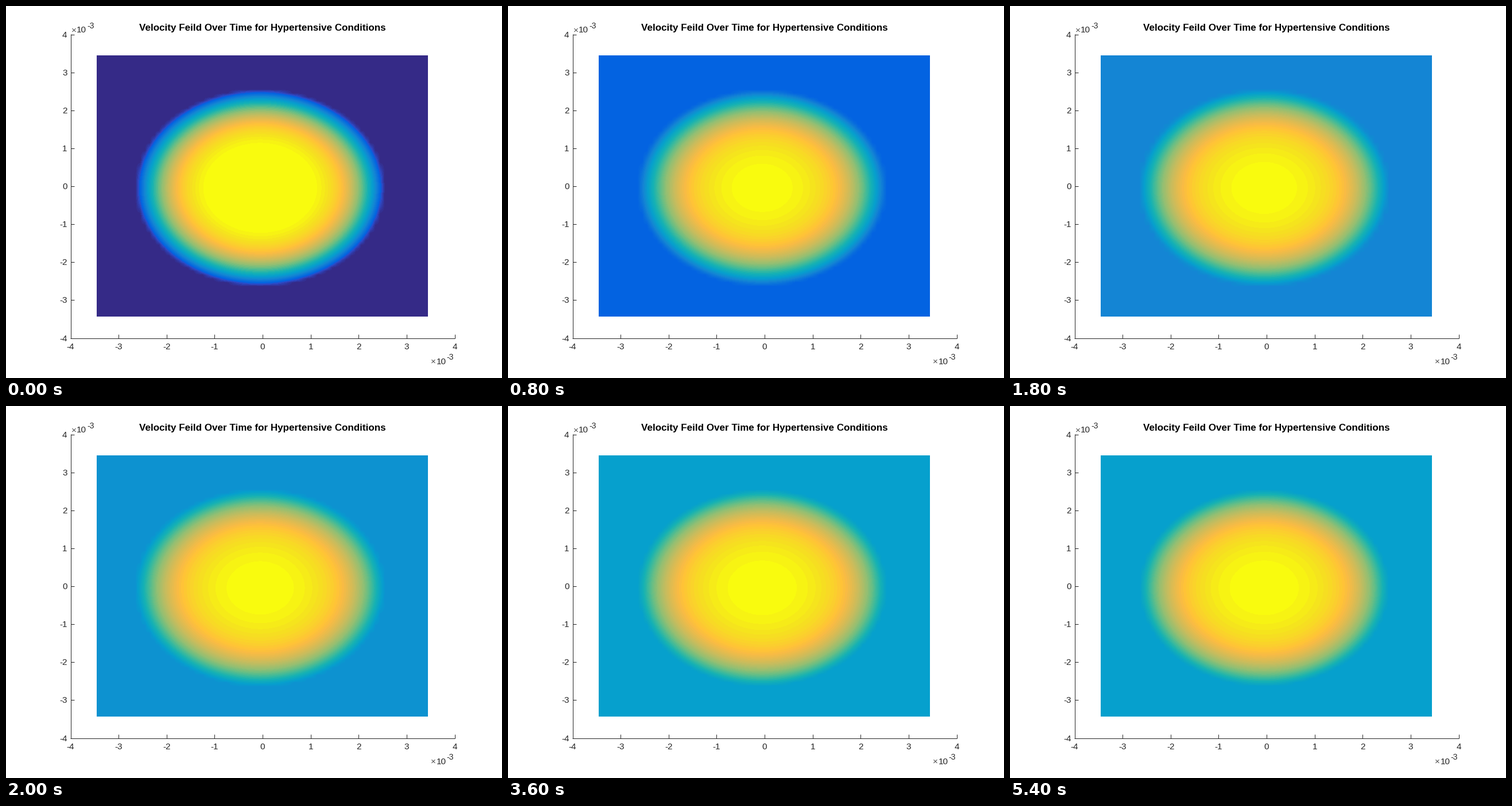
Animation, 864 px wide and 648 px high, one loop 5600 ms. Source, as a matplotlib script:

```python
import numpy as np
import matplotlib.pyplot as plt
from matplotlib.animation import FuncAnimation
from matplotlib.colors import to_rgb

W, H = 864, 648
FRAMES, INTERVAL = 28, 200
INK = "#262626"

plt.rcParams["font.family"] = "Liberation Sans"

# Key colours of the 64-level map
KEYS = {
    0: "#352a87", 5: "#2c4ac7", 8: "#0363e1", 16: "#1485d4", 22: "#06a0cd",
    28: "#15b1b4", 32: "#38b99e", 36: "#65be86", 40: "#92bf73",
    46: "#c8bc5d", 52: "#f8bb44", 54: "#ffc337", 60: "#f5e41d", 63: "#f9fb0e",
}
key_rgb = np.array([to_rgb(c) for c in KEYS.values()])
PARULA = np.stack([np.interp(np.arange(64), list(KEYS), channel)
                   for channel in key_rgb.T], axis=1)

# Data to pixel scale (units of 1e-3)
X0, Y0, SX, SY = 447, 313.5, 83.65, 66.1
LEFT, RIGHT, TOP, BOTTOM = 158, 735, 86, 541

STEP, RADIUS, CENTRE = 0.1, 2.59, -0.05
nodes = np.linspace(-3.45, 3.45, 70)
gx, gy = np.meshgrid(nodes, nodes)
dist = np.minimum(np.hypot(gx - CENTRE, gy - CENTRE) / RADIUS, 1)


def hat_weights(pos):
    """Linear interpolation weights from the grid nodes to each pixel."""
    pos = np.clip(pos, nodes[0], nodes[-1])
    return np.clip(1 - np.abs(pos[:, None] - nodes) / STEP, 0, 1)


WX = hat_weights((np.arange(LEFT, RIGHT) + 0.5 - X0) / SX)
WY = hat_weights((Y0 - np.arange(TOP, BOTTOM) - 0.5) / SY)


def wall_level(i):
    """Colour level of still fluid: two climbs with a pause between them."""
    return np.interp(i, [2, 3, 4, 6, 8, 11], [0.2, 1.2, 8.3, 14.2, 14.2, 22.2])


def field(i):
    # The blunt, slightly saturated profile rounds off over three steps
    mix = min(i / 3, 1)
    bend = 0.25 * mix
    gain = 1.03 - 0.03 * mix
    speed = gain * (1 - bend * dist ** 2 - (1 - bend) * dist ** 4)
    base = wall_level(i)
    level = WY @ (base + (64 - base) * speed) @ WX.T
    return PARULA[np.clip(level, 0, 63).astype(int)]


fig = plt.figure(figsize=(W / 72, H / 72), dpi=72, facecolor="white")
ax = fig.add_axes([0, 0, 1, 1])
ax.axis("off")
image = ax.imshow(field(0), extent=(LEFT, RIGHT, BOTTOM, TOP),
                  interpolation="nearest", aspect="auto")
ax.set_xlim(0, W)
ax.set_ylim(H, 0)


def line(xs, ys):
    ax.plot(xs, ys, color=INK, lw=1, solid_capstyle="butt")


def label(x, y, s, size=15.3, color=INK, **kw):
    ax.text(x, y, s, size=size, color=color, va="baseline", **kw)


def exponent(x, y):
    label(x, y, "×", color="#505050")
    label(x + 9.5, y, "10")
    label(x + 27.5, y - 7.5, "-3", size=14)


AXIS_X, AXIS_Y = 112.5, 578.5
line([AXIS_X, AXIS_X], [49, 579])
line([112, 782], [AXIS_Y, AXIS_Y])
for k in range(-4, 5):
    px = AXIS_X + (k + 4) * SX
    py = AXIS_Y - (k + 4) * SY
    line([px, px], [AXIS_Y, AXIS_Y - 6.5])
    line([AXIS_X, AXIS_X + 6.5], [py, py])
    label(px, 598.5, str(k), ha="center")
    label(106.5, py + 5, str(k), ha="right")

exponent(113.5, 46.5)
exponent(740, 624)
label(447, 43, "Velocity Feild Over Time for Hypertensive Conditions",
      size=17, color="black", weight="bold", ha="center")


def update(i):
    image.set_data(field(i))
    return [image]


anim = FuncAnimation(fig, update, frames=FRAMES, interval=INTERVAL,
                     repeat=True, repeat_delay=0)
plt.show()
```
